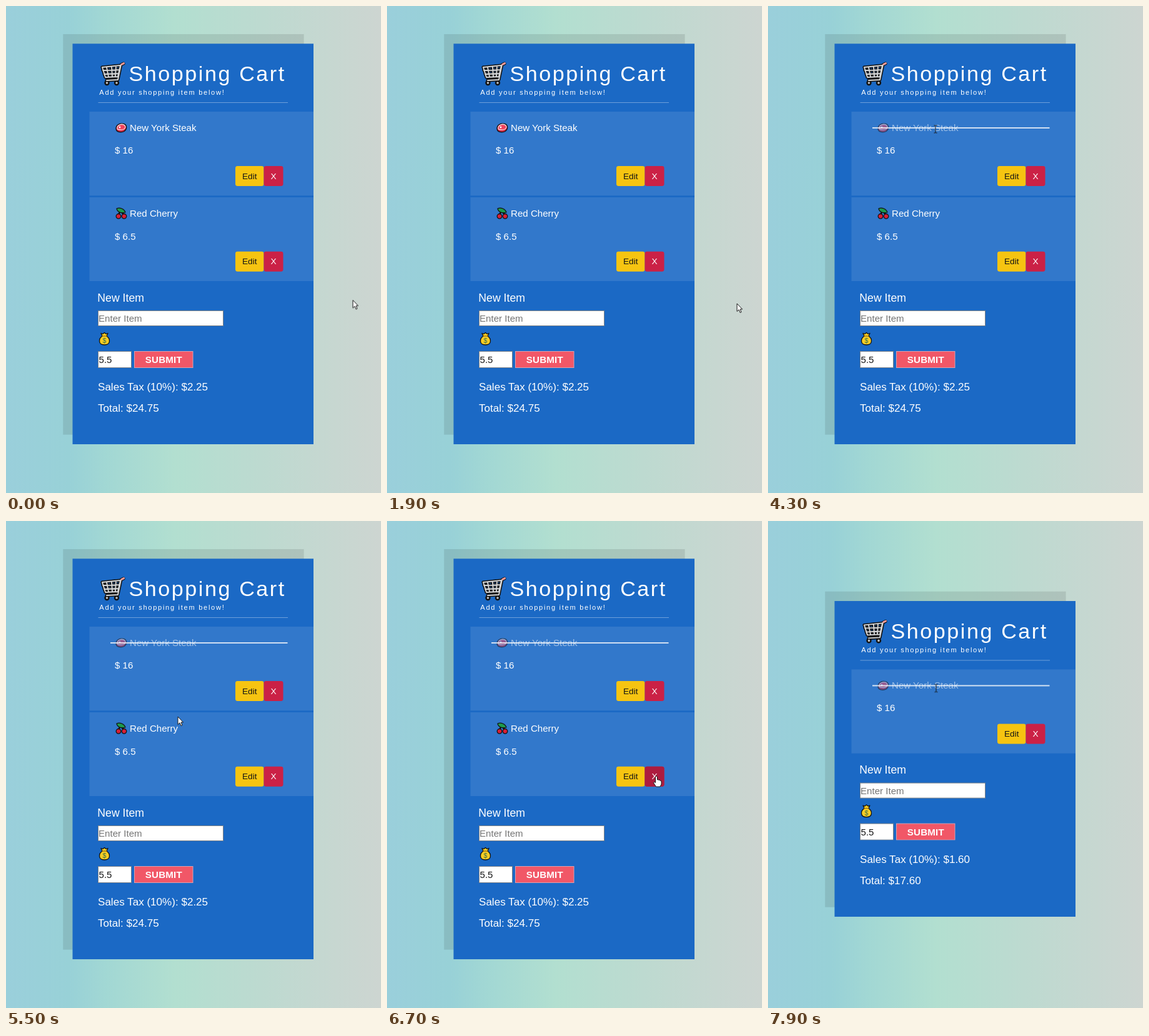
An HTML page for the animation above (8 s loop, 600 px wide and 779 px high).

```html
<!DOCTYPE html>
<html lang="en">
<head>
<meta charset="utf-8">
<title>Shopping Cart</title>
<style>
html, body { margin: 0; width: 100%; height: 100%; overflow: hidden; }
svg { display: block; width: 600px; height: 779px; font-family: "Liberation Sans", Arial, sans-serif; }
text { fill: #fff; white-space: pre; }
.title { font-size: 34.13px; letter-spacing: 2.56px; }
.tagline { font-size: 11.1px; letter-spacing: 1.707px; }
.item { font-size: 15.1px; }
.button { font-size: 13.65px; }
.sum { font-size: 17.07px; }
.label { font-size: 17.7px; }
.submit { font-size: 15.1px; font-weight: 700; letter-spacing: .2px; }
.dark { fill: #151515; }
.hint { fill: #757575; }
.ink { stroke: #111; stroke-width: 1.3; stroke-linejoin: round; }

/* Layout collapses when the second item is deleted at 6.8 s */
.panel, .upper, .lower, .before, .after, .done, .line, .hot, .pointer, .arrow, .beam, .hand {
  animation: 8s step-end infinite;
}
.panel { animation-name: shrink; }
.upper { animation-name: down; }
.lower { animation-name: up; }
.before { animation-name: leave; }
.after { animation-name: enter; }
.done { animation-name: dim; }
.line { animation-name: strike; }
.hot, .hand { animation-name: hover; }
.pointer { animation-name: travel; }
.arrow { animation-name: arrow; }
.beam { animation-name: beam; }

@keyframes shrink { 0% { y: 60.3px; height: 640.7px; } 85%, 100% { y: 128px; height: 505px; } }
@keyframes down { 0% { transform: none; } 85%, 100% { transform: translateY(68.4px); } }
@keyframes up { 0% { transform: none; } 85%, 100% { transform: translateY(-68.4px); } }
@keyframes leave { 0% { opacity: 1; } 85%, 100% { opacity: 0; } }
@keyframes enter { 0% { opacity: 0; } 85%, 100% { opacity: 1; } }
@keyframes dim { 0% { opacity: 1; } 51.25%, 100% { opacity: .53; } }
@keyframes strike { 0% { opacity: 0; } 51.25%, 100% { opacity: .78; } }
@keyframes hover { 0% { opacity: 0; } 80% { opacity: 1; } 85%, 100% { opacity: 0; } }
@keyframes beam { 0% { opacity: 0; } 43.75% { opacity: 1; } 62.5% { opacity: 0; } 98.75%, 100% { opacity: 1; } }
@keyframes arrow {
  0% { opacity: 1; } 43.75% { opacity: 0; } 62.5% { opacity: 1; }
  80% { opacity: 0; } 85% { opacity: 1; } 98.75%, 100% { opacity: 0; }
}
@keyframes travel {
  0% { transform: translate(555px, 470.5px); }
  12.5% { transform: translate(555px, 470.5px); animation-timing-function: steps(3); }
  16.25% { transform: translate(560px, 476px); }
  32.5% { transform: translate(560px, 476px); animation-timing-function: steps(7); }
  41.25% { transform: translate(290.5px, 214px); animation-timing-function: steps(2); }
  43.75% { transform: translate(268px, 197px); }
  61.25% { transform: translate(268px, 197px); animation-timing-function: steps(6); }
  68.75% { transform: translate(275px, 313px); }
  72.5% { transform: translate(275px, 313px); animation-timing-function: steps(6); }
  80% { transform: translate(431px, 408px); }
  85% { transform: translate(426.5px, 407.5px); }
  87.5% { transform: translate(426.5px, 407.5px); animation-timing-function: steps(9); }
  98.75%, 100% { transform: translate(269px, 267.5px); }
}
</style>
</head>
<body>
<svg viewBox="0 0 600 779">
  <defs>
    <linearGradient id="sky">
      <stop offset="0" stop-color="#9acfdb"/>
      <stop offset=".17" stop-color="#98d1d7"/>
      <stop offset=".26" stop-color="#a1d7d4"/>
      <stop offset=".45" stop-color="#b2dfd0"/>
      <stop offset=".68" stop-color="#bddad0"/>
      <stop offset="1" stop-color="#cdd5d1"/>
    </linearGradient>
    <g id="buttons">
      <rect x="367" y="256" width="45.5" height="32" rx="3.4" fill="#f6c411"/>
      <rect x="412.5" y="256" width="31" height="32" rx="3.4" fill="#cb2146"/>
      <text class="button dark" x="378" y="276.5">Edit</text>
    </g>
    <g id="cart" fill="none" stroke-linecap="round" stroke-linejoin="round">
      <path d="M154 98L183 95 179 113 159 114ZM188 92L184 94 179 118 161 119M161 98L164 113M169 97L170 113M176 96L175 113M155 103L182 102M157 109L180 108"/>
    </g>
  </defs>

  <rect width="600" height="779" fill="url(#sky)"/>
  <rect class="panel" x="91.3" y="60.3" width="385.3" height="640.7" fill="#000" opacity=".1" transform="translate(0 -15.3)"/>
  <rect class="panel" x="106.5" y="60.3" width="385.5" height="640.7" fill="#1b69c5"/>

  <g class="upper">
    <use href="#cart" stroke="#121212" stroke-width="5"/>
    <g fill="#bfc2c5" stroke="#121212" stroke-width="2.4">
      <circle cx="161.5" cy="123" r="3"/>
      <circle cx="177" cy="123" r="3"/>
    </g>
    <use href="#cart" stroke="#d5d7d9" stroke-width="1.9"/>
    <path d="M185 93.3L188.5 91.6" stroke="#f59a9a" stroke-width="3" stroke-linecap="round"/>
    <text class="title" x="196.4" y="119.5">Shopping Cart</text>
    <text class="tagline" x="149.3" y="142">Add your shopping item below!</text>
    <path d="M147.5 154.5H451" stroke="#fff" opacity=".36"/>

    <rect x="133.5" y="169" width="358.5" height="134.3" fill="#3278cb"/>
    <g class="done">
      <g class="ink">
        <path d="M176 196C176 190 182 187 188 188.5 194 190 194 197 189 200.5 184 203 176 202 176 196Z" fill="#d3233f"/>
        <path d="M178 194C180 189 187 188 190 191 193 195 188 199 183 198 179 198 177 197 178 194Z" fill="#f0415c" stroke="#fbd5d5"/>
        <circle cx="182" cy="194" r="1.4" fill="#fff" stroke="none"/>
      </g>
      <text class="item" x="198" y="200">New York Steak</text>
    </g>
    <path class="line" d="M167 195H450.5" stroke="#fff" stroke-width="2"/>
    <text class="item" x="174" y="236">$ 16</text>
    <use href="#buttons"/>
    <text class="button" x="423.4" y="276.5">X</text>
  </g>

  <g class="before">
    <rect x="133.5" y="306" width="358.5" height="134" fill="#3278cb"/>
    <g class="ink">
      <path d="M180 334L183 328 189 334" fill="none" stroke-width="2.6"/>
      <path d="M177 324C182 322 189 324 191 330 185 332 178 330 177 324Z" fill="#1d9a4b"/>
      <circle cx="180" cy="336.3" r="3.8" fill="#d81f35"/>
      <circle cx="189" cy="336.3" r="3.8" fill="#d81f35"/>
    </g>
    <text class="item" x="198" y="337">Red Cherry</text>
    <text class="item" x="174" y="373.5">$ 6.5</text>
    <use href="#buttons" y="136.7"/>
    <rect class="hot" x="412.5" y="392.7" width="31" height="32" rx="3.4" fill="#ad1c3f"/>
    <text class="button" x="423.4" y="413.3">X</text>
  </g>

  <g class="lower">
    <text class="label" x="146.3" y="472.5">New Item</text>
    <g fill="#fff" stroke="#7d8288">
      <rect x="147.5" y="487.5" width="200" height="24"/>
      <rect x="147.5" y="552.5" width="53" height="26"/>
    </g>
    <text class="item hint" x="148" y="505">Enter Item</text>
    <g class="ink">
      <path d="M154 528L152 523.5 155 524.5 157.5 522.5 160 524.5 163 523.5 161 528C167 532 168 542 157.5 542 147 542 148 532 154 528Z" fill="#f8cd23"/>
      <path d="M153.5 528H161.5" stroke="#9a6b12"/>
    </g>
    <text x="157.5" y="539" text-anchor="middle" font-size="10" style="fill:#2d6a4c">$</text>
    <text class="item dark" x="148.5" y="571">5.5</text>
    <rect x="205.5" y="552.5" width="93.5" height="26" fill="#f15767" stroke="#d9a0b0"/>
    <text class="submit" x="222.8" y="571">SUBMIT</text>
    <g class="before">
      <text class="sum" x="147" y="615">Sales Tax (10%): $2.25</text>
      <text class="sum" x="147" y="649">Total: $24.75</text>
    </g>
    <g class="after">
      <text class="sum" x="147" y="615">Sales Tax (10%): $1.60</text>
      <text class="sum" x="147" y="649">Total: $17.60</text>
    </g>
  </g>

  <g class="pointer" fill="#fff" stroke="#171717" stroke-linejoin="round">
    <path class="arrow" d="M0 0V12.5L3 9.8 5 14.5 7 13.6 5 9H8.5Z"/>
    <path class="beam" d="M-2.5 -6H-.5L0 -5.5 .5 -6H2.5M0 -5.5V5.5M-2.5 6H-.5L0 5.5 .5 6H2.5" fill="none"/>
    <path class="hand" d="M-1.5 1Q0 -1 1.5 1V6Q3 5 4 6.5 5.5 5.8 6 7.2 8 7 8 9V13L6 17H-.5L-4.5 11Q-4.5 8.5 -1.5 10.5Z"/>
  </g>
</svg>
</body>
</html>
```
